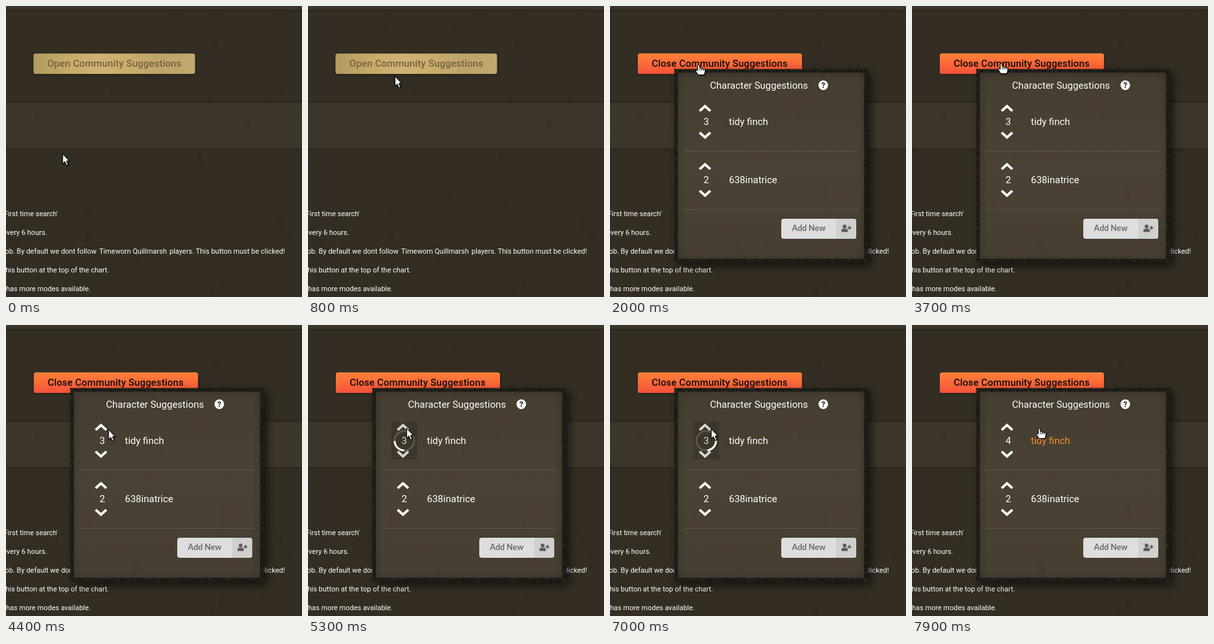
An HTML page with a canvas that plays this animation: 458x450 px, repeating every 8000 ms.

```html
<!DOCTYPE html>
<html lang="en">
<head>
<meta charset="utf-8">
<title>Community suggestions</title>
<style>
  html, body { margin: 0; width: 100%; height: 100%; overflow: hidden; background: #332d23; }
  canvas { display: block; width: 458px; height: 450px; }
</style>
</head>
<body>
<canvas id="stage" width="458" height="450"></canvas>
<script>
const W = 458, H = 450, LOOP = 8000, STEP = 100;
const canvas = document.getElementById('stage');
let ctx = canvas.getContext('2d');

// time, x, y of the pointer's hot spot
const PATH = [
  [100, 87, 228], [200, 88, 225], [400, 100, 191], [600, 119, 147],
  [800, 134, 108], [1000, 138, 91], [3600, 138, 91], [3700, 139, 89],
  [3800, 134, 95], [4000, 146, 121], [4200, 163, 158], [4300, 168, 165],
  [4400, 158, 161], [4500, 152, 159], [5800, 152, 159], [6000, 154, 160],
  [6800, 156, 160], [7300, 157, 160], [7500, 162, 160], [7600, 167, 160],
  [7700, 176, 160], [7800, 189, 160], [7900, 198, 160]
];
const SPIN = { angle: 134, at: 5300, period: 621 };

const clamp = v => Math.max(0, Math.min(1, v));
const ramp = (t, from, to) => clamp((t - from) / (to - from));

function pointerAt(t) {
  if (t <= PATH[0][0]) return PATH[0].slice(1);
  for (let i = 1; i < PATH.length; i++) {
    const [t0, x0, y0] = PATH[i - 1], [t1, x1, y1] = PATH[i];
    if (t <= t1) {
      const k = ramp(t, t0, t1);
      return [x0 + (x1 - x0) * k, y0 + (y1 - y0) * k];
    }
  }
  return PATH[PATH.length - 1].slice(1);
}

function text(str, x, y, font, color, align = 'left', spacing = 0) {
  ctx.font = font;
  ctx.fillStyle = color;
  ctx.textAlign = align;
  ctx.letterSpacing = spacing + 'px';
  ctx.fillText(str, x, y);
  ctx.letterSpacing = '0px';
}

function rounded(x, y, w, h, r) {
  ctx.beginPath();
  ctx.roundRect(x, y, w, h, r);
}

function rect(x, y, w, h, color) {
  ctx.fillStyle = color;
  ctx.fillRect(x, y, w, h);
}

function gradient(x0, y0, x1, y1, ...colors) {
  const g = ctx.createLinearGradient(x0, y0, x1, y1);
  colors.forEach((c, i) => g.addColorStop(i / (colors.length - 1), c));
  return g;
}

function shadow(color, blur, dx = 0, dy = 0) {
  ctx.shadowColor = color;
  ctx.shadowBlur = blur;
  ctx.shadowOffsetX = dx;
  ctx.shadowOffsetY = dy;
}

function randomizer(seed) {
  return () => (seed = (seed * 16807) % 2147483647) / 2147483647;
}

// Soft vertical smudges of the leather-like background
function smudges(x, y, w, h, count, seed, alpha) {
  const rnd = randomizer(seed);
  for (let i = 0; i < count; i++) {
    const tone = rnd() < .5 ? '0,0,0' : '110,95,70';
    ctx.fillStyle = `rgba(${tone},${rnd() * alpha})`;
    ctx.beginPath();
    ctx.ellipse(x + rnd() * w, y + rnd() * h, 1 + rnd() * 4, 2 + rnd() * 9, rnd() - .5, 0, 7);
    ctx.fill();
  }
}

function paintPage() {
  const font = '11px Roboto, sans-serif', ink = '#fff';
  rect(0, 0, W, H, '#332d23');
  rect(0, 0, W, 6, '#3b3428');
  rect(0, 148, W, 73, '#3c3529');
  smudges(0, 8, W, 140, 60, 71, .035);
  smudges(0, 150, W, 69, 36, 913, .04);
  smudges(0, 222, W, 228, 90, 4242, .035);
  for (const y of [6, 147, 220]) {
    rect(0, y, W, 2, '#2b251b');
    rect(0, y + 2, W, 1, 'rgba(0,0,0,.07)');
  }
  text("'First time search'", 80, 325, font, ink, 'right');
  text('Data refreshes every 6 hours.', 63.5, 354, font, ink, 'right');
  text('job. By default we dont follow', 140, 383, font, ink, 'right');
  text('Timeworn Quillmarsh', 196.5, 383, font, ink, 'center');
  text('players. This button must be clicked!', 431.5, 383, font, ink, 'right');
  text('this button at the top of the chart.', 159.5, 412, font, ink, 'right');
  text('It has more modes available.', 131, 441, font, ink, 'right');
}

function toggleButton(t) {
  const open = t >= 2000, hot = ramp(t, 850, 1200);
  const x = open ? 43 : 42.5, w = open ? 254 : 250;
  ctx.save();
  shadow('rgba(0,0,0,.35)', 4, 0, 1);
  rounded(x, 73.5, w, 31.5, 3.5);
  ctx.fillStyle = gradient(x, 90, x + w, 90, '#b39a61', '#c5a967', '#cfb373', '#c9ad6c', '#bea368', '#c0a970');
  ctx.fill();
  ctx.restore();
  rounded(x, 73.5, w, 31.5, 3.5);
  ctx.globalAlpha = hot;
  ctx.fillStyle = gradient(0, 73, 0, 105, '#ff8139', '#fb6a38', '#f6513a');
  ctx.fill();
  ctx.globalAlpha = 1;
  const mix = (a, b) => Math.round(a + (b - a) * hot);
  text((open ? 'Close' : 'Open') + ' Community Suggestions', x + 21.5, 94,
    '500 15px Roboto, sans-serif', `rgb(${mix(115, 16)},${mix(99, 8)},${mix(70, 5)})`, 'left', .15);
}

function chevron(cx, tip, dir, color = '#fff') {
  ctx.beginPath();
  ctx.moveTo(cx - 8.3, tip + dir * 9.3);
  ctx.lineTo(cx, tip + dir * 1.8);
  ctx.lineTo(cx + 8.3, tip + dir * 9.3);
  ctx.strokeStyle = color;
  ctx.lineWidth = 3.8;
  ctx.lineJoin = 'miter';
  ctx.lineCap = 'butt';
  ctx.stroke();
}

function suggestion(y, votes, name, nameColor, upColor) {
  const font = '15px Roboto, sans-serif';
  chevron(147, y - 26, 1, upColor);
  chevron(147, y + 26, -1);
  text(votes, 149, y + 5, font, '#fff', 'center');
  text(name, 184, y + 5, font, nameColor);
  rect(114, y + 45, 270, 1, '#5d5547');
}

// Dark braided border: short seeded ticks between two rims
function frameBox() {
  ctx.save();
  shadow('rgba(0,0,0,.6)', 12, 5, 5);
  rect(99.5, 97.5, 299, 299, '#1d1c18');
  ctx.restore();
  const rnd = randomizer(77);
  for (let i = 0; i < 300; i += 2) {
    for (const side of [0, 294]) {
      const tone = rnd() < .5 ? 'rgba(10,10,8,.6)' : 'rgba(75,74,64,.45)';
      rect(99 + i, 97 + side + rnd() * 5, 1.5, 1.5, tone);
      rect(99 + side + rnd() * 5, 97 + i, 1.5, 1.5, tone);
    }
  }
  rect(105, 103, 288, 288, gradient(0, 103, 0, 391, '#453d30', '#4a4234', '#463e31'));
  ctx.save();
  ctx.beginPath();
  ctx.rect(105, 103, 288, 288);
  ctx.clip();
  smudges(105, 103, 288, 288, 90, 5151, .035);
  shadow('rgba(0,0,0,.6)', 8);
  ctx.strokeStyle = '#1b1a16';
  ctx.lineWidth = 2;
  ctx.strokeRect(104, 102, 290, 290);
  ctx.restore();
}

function helpIcon() {
  ctx.fillStyle = '#fff';
  ctx.beginPath();
  ctx.arc(330, 122.5, 7.4, 0, 7);
  ctx.fill();
  text('?', 330, 127, '900 12px Roboto, sans-serif', '#40382c', 'center');
}

function addButton() {
  rounded(265, 329, 116, 31, 4);
  ctx.fillStyle = '#dedede';
  ctx.fill();
  rounded(350, 329, 31, 31, [0, 4, 4, 0]);
  ctx.fillStyle = '#d0d0cf';
  ctx.fill();
  text('Add New', 307.5, 348, 'bold 12.5px Lato, sans-serif', '#6b6a68', 'center');
  ctx.fillStyle = '#5c5b58';
  ctx.beginPath();
  ctx.arc(363, 341, 2.9, 0, 7);
  ctx.fill();
  rounded(358, 344.5, 10, 5, [3, 3, 1, 1]);
  ctx.fill();
  rect(367.5, 342.2, 6, 1.8, '#5c5b58');
  rect(369.6, 340, 1.8, 6, '#5c5b58');
}

function loader(t) {
  const fade = ramp(t, 4900, 5100), turn = Math.PI / 180;
  ctx.globalAlpha = fade;
  rect(129, 150, 40, 58, 'rgba(0,0,0,.16)');
  ctx.lineWidth = 3;
  ctx.strokeStyle = 'rgba(255,255,255,.16)';
  ctx.beginPath();
  ctx.arc(149, 179, 15, 0, 7);
  ctx.stroke();
  const mid = (SPIN.angle + (t - SPIN.at) / SPIN.period * 360) * turn;
  ctx.strokeStyle = '#fff';
  ctx.beginPath();
  ctx.arc(149, 179, 15, mid - 44 * turn, mid + 44 * turn);
  ctx.stroke();
  ctx.globalAlpha = 1;
}

function popup(t) {
  frameBox();
  text('Character Suggestions', 230.5, 128, '15px Roboto, sans-serif', '#fff', 'center');
  helpIcon();
  const hoverUp = t >= 4500 && t < 5000;
  const upColor = hoverUp ? (t < 4600 ? '#fbc38e' : '#f78f2e') : '#fff';
  const nameColor = t >= 7900 ? '#f58f2c' : t >= 7800 ? '#fac591' : '#fff';
  suggestion(179, t >= 7700 ? '4' : '3', 'tidy finch', nameColor, upColor);
  suggestion(269, '2', '638inatrice', '#fff', '#fff');
  addButton();
  if (t >= 5000 && t < 7700) loader(t);
}

function arrowCursor() {
  ctx.beginPath();
  ctx.moveTo(.5, .5);
  for (const [x, y] of [[.5, 16], [4, 12.6], [6.6, 18.6], [9.2, 17.5], [6.7, 11.7], [11, 11.7]]) ctx.lineTo(x, y);
  ctx.closePath();
}

function handCursor() {
  ctx.beginPath();
  ctx.moveTo(-2.7, 8.5);
  ctx.lineTo(-2.7, 1);
  ctx.quadraticCurveTo(-1, -1.4, .8, 1);
  ctx.lineTo(.8, 4.8);
  for (const x of [.8, 3.6, 6.4]) ctx.quadraticCurveTo(x + 1.6, 4 + x * .2, x + 2.8, 6 + x * .15);
  ctx.lineTo(9, 11.5);
  ctx.lineTo(7.5, 15.5);
  ctx.lineTo(-1.5, 15.5);
  ctx.lineTo(-5.5, 9.8);
  ctx.quadraticCurveTo(-5.6, 6.8, -2.7, 8.5);
  ctx.closePath();
}

function pointer(t) {
  const [x, y] = pointerAt(t);
  const hand = (t >= 900 && t < 3900) || (t >= 4500 && t < 5000) || t >= 7800;
  ctx.save();
  ctx.translate(Math.round(x), Math.round(y));
  shadow('rgba(0,0,0,.4)', 2, 1, 1);
  hand ? handCursor() : arrowCursor();
  ctx.fillStyle = '#fff';
  ctx.fill();
  ctx.strokeStyle = '#000';
  ctx.lineWidth = 1;
  ctx.lineJoin = 'round';
  ctx.stroke();
  if (hand) {
    shadow('transparent', 0);
    ctx.beginPath();
    for (const dx of [1, 3.7, 6.4]) {
      ctx.moveTo(dx, 5.8);
      ctx.lineTo(dx, 9.3);
    }
    ctx.lineWidth = .8;
    ctx.stroke();
  }
  ctx.restore();
}

const page = document.createElement('canvas');
page.width = W;
page.height = H;
function buildPage() {
  const screen = ctx;
  ctx = page.getContext('2d');
  paintPage();
  ctx = screen;
}

function draw(now) {
  const t = Math.floor((now % LOOP) / STEP) * STEP;
  ctx.drawImage(page, 0, 0);
  toggleButton(t);
  if (t >= 2000) popup(t);
  pointer(t);
}

buildPage();
const start = performance.now();
function tick() {
  draw(performance.now() - start);
  requestAnimationFrame(tick);
}
tick();
</script>
</body>
</html>
```
